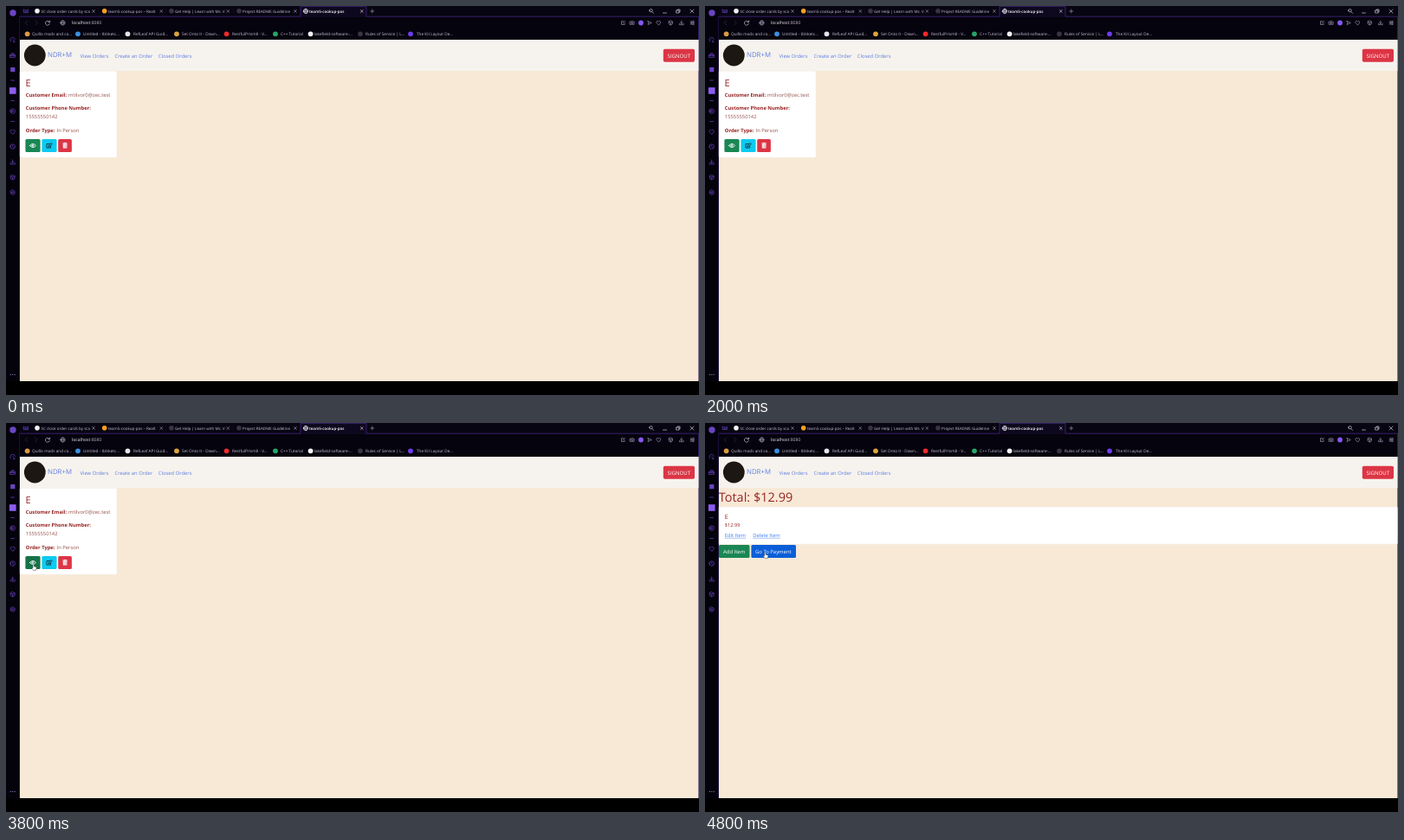
Recreate the animation shown at these times as an HTML page. Size 800x450 px, loop 5 s.

```html
<!DOCTYPE html>
<html lang="en">
<head>
<meta charset="utf-8">
<title>Orders</title>
<style>
  html, body { margin: 0; width: 100%; height: 100%; overflow: hidden; background: #000; }
  svg { display: block; width: 800px; height: 450px; }
  text { font-family: "Open Sans", "Noto Sans", sans-serif; text-rendering: geometricPrecision; white-space: pre; }
</style>
</head>
<body>
<svg id="stage" viewBox="0 0 800 450" xmlns="http://www.w3.org/2000/svg"></svg>
<script>
const LOOP = 5000, STEP = 100;
const VIOLET = '#6a45c4', PALE = '#c9c3d8', RED = '#dc3545', BROWN = '#972524', LINK = '#5f7de0';

const rect = (x, y, w, h, fill, r = 0, extra = '') =>
  `<rect x="${x}" y="${y}" width="${w}" height="${h}" rx="${r}" fill="${fill}" ${extra}/>`;
const dot = (x, y, r, fill) => `<circle cx="${x}" cy="${y}" r="${r}" fill="${fill}"/>`;
const text = (x, y, size, fill, str, weight = 400) =>
  `<text x="${x}" y="${y}" font-size="${size}" fill="${fill}" font-weight="${weight}">${str}</text>`;
const icon = (name, x, y, color, scale = 1, width = 0.7) =>
  `<path d="${shapes[name]}" transform="translate(${x} ${y}) scale(${scale})" fill="none" stroke="${color}"
    stroke-width="${width}" stroke-linecap="round" stroke-linejoin="round"/>`;

// Line icons, centred on 0,0 and about 6 px wide
const shapes = {
  cross: 'M-1.6-1.6L1.6 1.6M1.6-1.6L-1.6 1.6',
  plus: 'M-2 0H2M0-2V2',
  dash: 'M-2 0H2',
  back: 'M1.2-2.4L-1.2 0L1.2 2.4',
  next: 'M-1.2-2.4L1.2 0L-1.2 2.4',
  reload: 'M2.2-1A2.5 2.5 0 1 0 2.4 1M2.6-2.5V-.8H.8',
  globe: 'M-2.6 0A2.6 2.6 0 1 0 2.6 0A2.6 2.6 0 1 0-2.6 0ZM-2.6 0H2.6M0-2.6C-1.6-1-1.6 1 0 2.6C1.6 1 1.6-1 0-2.6',
  search: 'M-2.2-.6A1.7 1.7 0 1 0 1.2-.6A1.7 1.7 0 1 0-2.2-.6ZM.8.8L2.6 2.6',
  restore: 'M-2-1H1V2H-2ZM-1-1V-2H2V1H1',
  mask: 'M-2.4-1.8L-1.2-1H1.2L2.4-1.8V1.6H-2.4ZM-1 .4H1',
  note: 'M1.8.4V2.2H-2.2V-2H.4M-.5.6L2.3-2.2',
  camera: 'M-2.6-1.5H-1.2L-.7-2.2H.7L1.2-1.5H2.6V2H-2.6ZM-.9.2A.9.9 0 1 0 .9.2A.9.9 0 1 0-.9.2Z',
  send: 'M-2.2-2.2L2.6 0L-2.2 2.2L-1.4 0Z',
  heart: 'M0 2.6L-2.5 0C-3.4-1.6-1.4-3.4 0-1.4C1.4-3.4 3.4-1.6 2.5 0Z',
  cube: 'M0-2.7L2.4-1.4V1.4L0 2.7L-2.4 1.4V-1.4ZM-2.4-1.4L0 0L2.4-1.4M0 0V2.7',
  load: 'M0-2.6V1M-1.5-.4L0 1L1.5-.4M-2.6 1V2.4H2.6V1',
  sliders: 'M-2.4-1.8H2.4M-2.4 0H2.4M-2.4 1.8H2.4M1-2.4V-1.2M-1-.6V.6M1 1.2V2.4',
  gauge: 'M-2.1 2A2.8 2.8 0 1 1 2.7-.6M0 0L2 1.6M.6 2.6H2.4',
  bag: 'M-2.7-.8H2.7V2.4H-2.7ZM-1.3-.8V-2.2H1.3V-.8M-2.7.6H2.7',
  play: 'M-2.8 0A2.8 2.8 0 1 0 2.8 0A2.8 2.8 0 1 0-2.8 0ZM-.7-1.2L1.3 0L-.7 1.2Z',
  clock: 'M-2.8 0A2.8 2.8 0 1 0 2.8 0A2.8 2.8 0 1 0-2.8 0ZM0-1.5V.2L1 .8',
  gear: 'M0-2.8L2.4-1.4V1.4L0 2.8L-2.4 1.4V-1.4ZM-1 0A1 1 0 1 0 1 0A1 1 0 1 0-1 0Z',
  eye: 'M-3.4 0C-1.7-2.7 1.7-2.7 3.4 0C1.7 2.7-1.7 2.7-3.4 0ZM-1 0A1 1 0 1 0 1 0A1 1 0 1 0-1 0Z',
  edit: 'M1.6.6V2.6H-3V-2H.4M-1 .9L-.6-.5L2.3-3L3.4-1.9L.6.7Z'
};

function sidebar() {
  const rows = [['gauge', 39], ['bag', 57], ['dash', 86], ['dash', 109.6], ['play', 121.6], ['dash', 133.6],
    ['heart', 145.6], ['clock', 162.6], ['load', 180.6], ['cube', 198.2], ['gear', 215.6]];
  return rect(0, 0, 15.5, 434, '#04020b')
    + dot(8, 8, 3.7, VIOLET)
    + rows.map(([name, y]) => icon(name, 7.7, y, VIOLET)).join('')
    + rect(5.2, 71, 5.2, 5.2, VIOLET)
    + rect(4, 94.2, 7.6, 7.6, '#8b5cf0')
    + [5.5, 7.8, 10.1].map(x => dot(x, 426.3, 0.6, '#a394d0')).join('');
}

function tabBar() {
  const tabs = [
    [36, '#f2f2f5', 40.5, 'SC close order cards by sca', 101],
    [113.7, '#f5a021', 118, 'team5-cookup-pos – Realt', 179.3],
    [191, '#3a3340', 195, 'Get Help | Learn with Ms. V', 256.3],
    [269, '#3a3340', 273, 'Project README Guideline', 334]
  ];
  return rect(0, 0, 800, 12, '#080512')
    + icon('mask', 23, 6, VIOLET)
    + tabs.map(([ix, color, x, str, close]) => dot(ix, 5.8, 2.8, color)
        + text(x, 7.6, 4.5, PALE, str) + icon('cross', close, 6, PALE, 0.9, 0.55)).join('')
    + [106.5, 184, 262].map(x => rect(x, 3, 0.4, 6, '#1d1433')).join('')
    + rect(340, 0, 76, 13, '#0e081f')
    + `<path d="M15.5 434V12.2H340V.3H416V12.2H799.6V434" fill="none" stroke="#4b2a94" stroke-width=".7"/>`
    + icon('globe', 346, 6, '#f0eef6')
    + text(350, 7.6, 4.5, '#fff', 'team5-cookup-pos', 600)
    + icon('cross', 410.8, 6, '#fff', 0.9, 0.6)
    + icon('plus', 422.8, 6, '#a99fc4', 1, 0.6)
    + icon('search', 745, 5.8, PALE) + icon('dash', 760.5, 8, PALE)
    + icon('restore', 776, 6, PALE) + icon('cross', 792, 6, PALE, 1.25, 0.55);
}

function addressBar() {
  const tools = [['note', 712.5], ['camera', 722.8], ['send', 743], ['heart', 753.3],
    ['cube', 767.3], ['load', 779.8], ['sliders', 792.3]];
  return icon('back', 23.5, 19.5, '#3a334c') + icon('next', 35, 19.5, '#3a334c')
    + icon('reload', 48, 19.5, PALE) + icon('globe', 65.5, 19.5, '#9d95b4')
    + text(76, 21.4, 5.1, '#f1eff6', 'localhost<tspan fill="#b9b3c8">:8080</tspan>')
    + tools.map(([name, x]) => icon(name, x, 19.5, '#aaa2c2', 0.9)).join('')
    + dot(733, 19.5, 2.9, '#8657f2');
}

function bookmarks() {
  const marks = [
    [24.6, '#d99a45', 30, 'Quillo mods and co...'],
    [83, '#3b8fe0', 89, 'Untitled - tblsketc...'],
    [140.5, '#e4e4e8', 147, 'RefLeaf API Guid...'],
    [197, '#dba43c', 203, 'Set Onto It - Down...'],
    [254.6, '#ee2b2b', 261, 'RestfulPrism8 - V...'],
    [311, '#25a567', 317, 'C++ Tutorial'],
    [351.6, '#f2f2f5', 355.8, 'lakefield-software-...'],
    [409, '#3a3340', 415, 'Rules of Service | L...'],
    [467, '#6c3df0', 474, 'The Kit Layout De...']
  ];
  return marks.map(([ix, color, x, str]) => dot(ix, 32.3, 2.9, color) + text(x, 34.1, 4.7, PALE, str)).join('');
}

function header() {
  return rect(16, 39, 783.4, 36, '#f6f3ee')
    + dot(33.3, 57, 12.4, '#1d1712')
    + text(48, 59.4, 7.83, LINK, 'NDR+M')
    + text(85.5, 59.6, 5.85, LINK, 'View Orders')
    + text(125.5, 59.6, 5.85, LINK, 'Create an Order')
    + text(175.8, 59.6, 5.85, LINK, 'Closed Orders')
    + rect(758.8, 49.8, 36.2, 15, RED, 1.8)
    + text(763.6, 59.6, 6.05, '#fff', 'SIGNOUT');
}

function orders() {
  const field = (y, label, x, value, vy = y) =>
    text(22.8, y, 5.8, BROWN, label, 700) + text(x, vy, 5.85, '#94514c', value);
  return `<g id="orders">`
    + rect(16, 75.2, 112, 100, '#fff', 1.5, 'stroke="#ece4da" stroke-width=".4"')
    + text(22.6, 92.8, 11, BROWN, 'E', 500)
    + field(105, 'Customer Email:', 72, 'mtilvor0@zec.test')
    + field(120.4, 'Customer Phone Number:', 22.8, '15555550142', 130)
    + field(145.5, 'Order Type:', 58.5, 'In Person')
    + rect(22.4, 154, 17.2, 15, '#198754', 1.6, 'id="view"')
    + icon('eye', 31, 161.5, '#fff', 1, 0.9)
    + rect(41.4, 154, 17.2, 15, '#0dcaf0', 1.6)
    + icon('edit', 50, 161.5, '#10242c', 1, 0.8)
    + rect(60.2, 154, 15.7, 15, RED, 1.6)
    + rect(65.8, 159.6, 4.6, 5, '#fff', 0.6) + rect(65.3, 158.5, 5.6, 0.9, '#fff')
    + rect(67, 157.9, 2.2, 0.8, '#fff')
    + [67, 68.1, 69.2].map(x => rect(x - 0.15, 160.4, 0.35, 3.4, RED)).join('')
    + `</g>`;
}

function details() {
  const link = (x, w, str) => text(x, 132, 5.83, '#3b7df0', str) + rect(x, 132.9, w, 0.45, '#3b7df0');
  return `<g id="details">`
    + text(15.7, 90.6, 14.5, BROWN, 'Total: $12.99', 500)
    + rect(16, 97, 783.4, 43.2, '#fff', 1.2, 'stroke="#ece4da" stroke-width=".4"')
    + text(22.7, 110.8, 7.3, BROWN, 'E', 500)
    + text(22.8, 120.4, 5.65, BROWN, '$12.99')
    + link(22.8, 24.2, 'Edit Item') + link(55.2, 31.6, 'Delete Item')
    + rect(16, 141, 35.5, 15, '#198754', 1.6)
    + text(21, 150.9, 5.95, '#fff', 'Add Item')
    + rect(53.4, 141, 51.6, 15, '#0d6efd', 1.6, 'id="pay"')
    + text(58, 150.9, 5.9, '#fff', 'Go To Payment')
    + `</g>`;
}

const pointer = `<g id="pointer" stroke="#2b2b33" stroke-width=".45" stroke-linejoin="round" fill="#fff">
  <path id="arrow" d="M0 0V5.3L1.2 4.2L2 6L2.9 5.6L2.1 3.9H3.7Z"/>
  <path id="hand" d="M-.7 .5Q0-.5 .7 .5V2.6L3 3.1Q3.7 3.4 3.5 4.3L2.8 7H-.3L-2 4.6Q-2.2 3.7-1.4 3.9L-.7 4.5Z"/>
</g>`;

const stage = document.getElementById('stage');
stage.innerHTML = rect(0, 0, 800, 434, '#05030d') + tabBar() + sidebar() + addressBar() + bookmarks()
  + rect(16, 39, 783.4, 395, '#f8e9d7') + header() + orders() + details() + pointer;

// Pointer tip per 100 ms step, from the first step of each run
const runs = [
  [21, [[170, 300], [150, 274], [133, 250], [118, 230], [106, 215], [102, 210.5],
        [96, 204], [88, 197], [82, 192], [78, 188.4], [75.6, 186.7],
        [74, 185.8], [70, 183], [62, 178], [52, 172], [40.4, 167], [32, 163.6], [31.7, 163.4]]],
  [39, [[51.6, 191.2], [60, 201.5], [64, 204.6], [66, 202.6], [67, 198],
        [68, 186], [68.5, 172], [69, 160], [69.3, 152], [69.4, 149.6]]]
];

const $ = id => document.getElementById(id);
const show = (id, on) => $(id).setAttribute('visibility', on ? 'inherit' : 'hidden');
const inside = ([x, y], l, t, r, b) => x >= l && x <= r && y >= t && y <= b;

function tipAt(step) {
  const run = runs.filter(([first]) => step >= first).pop();
  return run && run[1][Math.min(step - run[0], run[1].length - 1)];
}

function draw(time) {
  const step = Math.floor((time % LOOP) / STEP);
  const paid = step >= 39;
  const tip = tipAt(step);
  const onView = !!tip && !paid && inside(tip, 22, 154, 39.6, 169);
  const onPay = !!tip && paid && inside(tip, 53, 141, 105, 156);

  $('orders').style.display = paid ? 'none' : '';
  $('details').style.display = paid ? '' : 'none';
  $('view').setAttribute('fill', onView ? '#157347' : '#198754');
  $('pay').setAttribute('fill', onPay ? '#0b5ed7' : '#0d6efd');
  show('pointer', tip);
  show('arrow', !onView && !onPay);
  show('hand', onView || onPay);
  if (tip) $('pointer').setAttribute('transform', `translate(${tip})`);
}

const start = performance.now();
function tick() {
  draw(performance.now() - start);
  requestAnimationFrame(tick);
}
tick();
</script>
</body>
</html>
```
